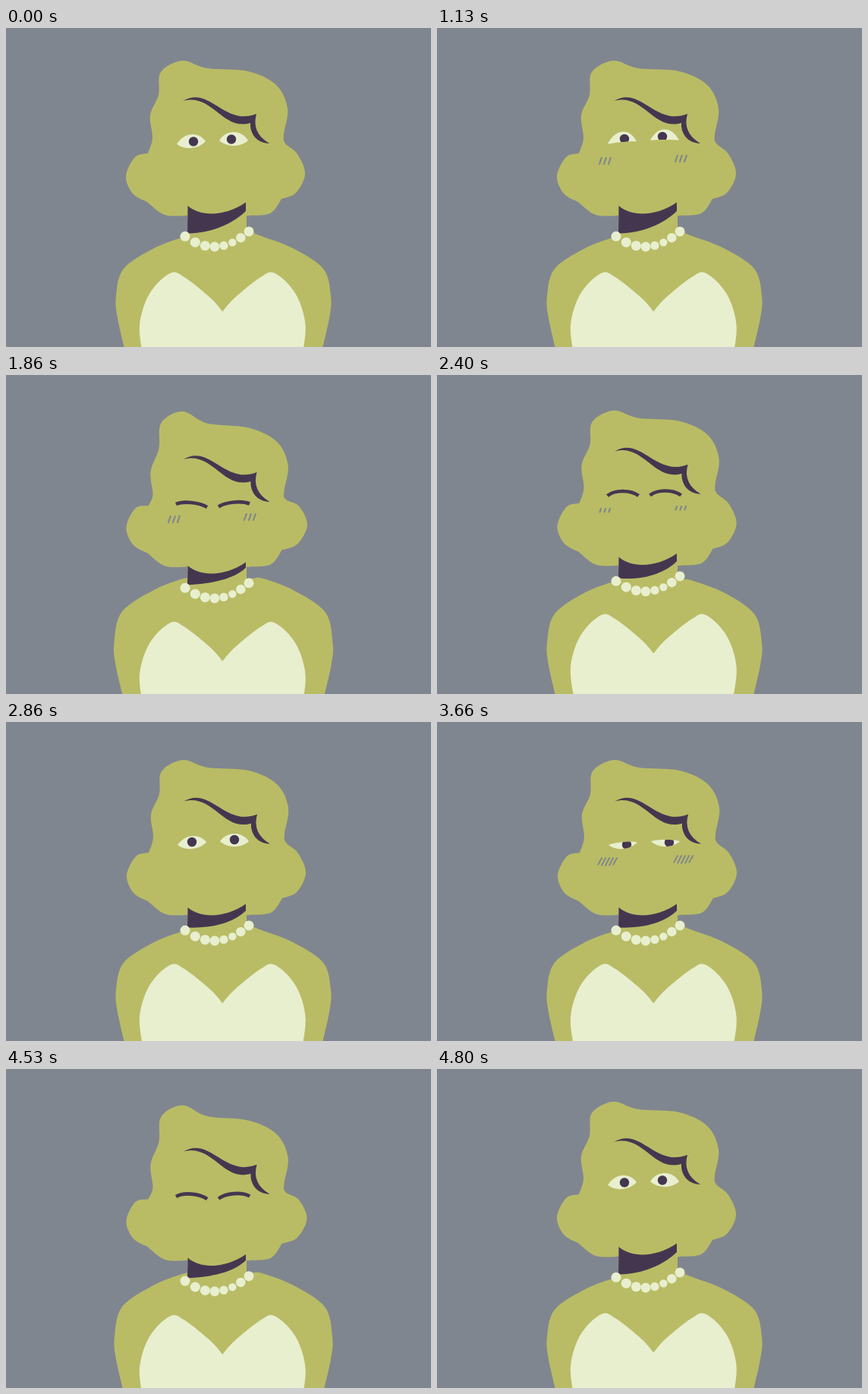
An HTML page with a canvas for the animation above (5 s loop, 560 px wide and 420 px high).

```html
<!DOCTYPE html>
<html lang="en">
<head>
<meta charset="utf-8">
<title>Portrait</title>
<style>
html, body { margin: 0; width: 100%; height: 100%; overflow: hidden; background: #80868f; }
canvas { display: block; }
</style>
</head>
<body>
<canvas id="stage" width="560" height="420"></canvas>
<script>
const ctx = document.getElementById('stage').getContext('2d');
const LOOP = 5000;
const BG = '#80868f', SKIN = '#b9bc65', CREAM = '#e8efcf', DARK = '#453650', BLUSH = '#82878a';

// Outlines by key points; a repeated point makes a corner.
const HEAD = [
  [201, 88], [204, 58], [232, 43], [265, 53], [319, 57], [356, 75], [371, 106], [366, 140],
  [368, 152], [384, 166], [394, 192], [382, 217], [363, 225], [363, 225], [348, 244], [317, 247],
  [317, 247], [240, 247], [240, 247], [209, 246], [186, 229], [186, 229], [167, 218], [158, 195],
  [170, 170], [187, 165], [187, 165], [193, 145], [190, 115]
];
const mirror = (half, axis) => [...half, ...half.map(([x, y]) => [2 * axis - x, y]).reverse()];
const SHOULDERS = mirror([
  [158, 430], [158, 430], [147, 382], [145, 353], [155, 317], [195, 290], [234, 275], [247, 270], [247, 270]
], 286.5);
const DRESS = mirror([
  [182, 440], [182, 440], [176, 392], [189, 350], [216, 323], [235, 328], [270, 356], [285, 373]
], 285.3);
const CURL = new Path2D('M233 96C268 75 288 130 330 113Q323 138 347 152C330 152 321 138 322 125C285 136 272 85 233 96');

// sink lowers the head, squash compresses the figure, rise lifts the chest.
const REST = {
  sink: 0, squash: 0, rise: 0,
  up: 11, down: 7, cross: 3, gaze: 0, look: -1.5, shut: 0, blush: 0
};
const LASHES = { up: 6, down: 0, shut: 1 };
const linear = k => k;
const anticipate = k => k * (3 * k - 2);
const spring = k => 1 - (1 - .6 * k) * Math.cos(k * 2.5 * Math.PI);

// Each phase moves to new values in a number of held steps.
const phase = (at, steps, gap, to, ease = linear) => ({ at, steps, gap, to, ease });
const PHASES = [
  phase(400, 3, 130, { up: 14.5, down: -1, look: -5, blush: .4 }),
  phase(800, 1, 130, { blush: 1 }),
  phase(1000, 3, 130, { ...LASHES, sink: -.6 }, anticipate),
  phase(1400, 6, 92, { sink: 0, squash: 1, up: 4 }, spring),
  phase(2000, 3, 130, { sink: 1, squash: 0, up: 6, blush: .4 }),
  phase(2400, 1, 60, { sink: .55, rise: 1 }),
  phase(2460, 1, 60, { sink: 1, rise: 0 }),
  phase(2600, 3, 130, { up: 10, down: 7, cross: 0, look: -2, shut: 0, blush: 0 }),
  phase(3400, 3, 130, { up: 2, gaze: 5, look: 1.5, blush: 1.5 }),
  phase(3800, 3, 130, { up: .3, gaze: 6, look: 2, blush: 2 }),
  phase(4400, 2, 65, { ...LASHES, up: 4, squash: 1.2, sink: 0, blush: 0 }),
  phase(4530, 3, 65, { ...REST, up: 7, sink: .3 }),
  phase(4800, 1, 60, REST)
];

function poseAt(t) {
  const p = { ...REST };
  for (const { at, steps, gap, to, ease } of PHASES) {
    if (t < at) break;
    const k = ease(Math.min(steps, 1 + Math.floor((t - at) / gap)) / steps);
    for (const n in to) p[n] += (to[n] - p[n]) * k;
  }
  return p;
}

const clamp = v => Math.max(0, Math.min(1, v));

// Closed Catmull-Rom curve.
function shape(pts, color) {
  const n = pts.length, at = i => pts[(i + n) % n];
  ctx.beginPath();
  ctx.moveTo(...pts[0]);
  for (let i = 0; i < n; i++) {
    const a = at(i - 1), b = at(i), c = at(i + 1), d = at(i + 2);
    ctx.bezierCurveTo(b[0] + (c[0] - a[0]) / 6, b[1] + (c[1] - a[1]) / 6,
      c[0] - (d[0] - b[0]) / 6, c[1] - (d[1] - b[1]) / 6, c[0], c[1]);
  }
  ctx.fillStyle = color;
  ctx.fill();
}

function disc(x, y, r, color) {
  ctx.beginPath();
  ctx.arc(x, y, r, 0, 7);
  ctx.fillStyle = color;
  ctx.fill();
}

function drawBody(p) {
  const hunch = 7 * p.squash + 3.5 * p.rise;
  shape(SHOULDERS.map(([x, y]) => [
    x + Math.sign(x - 286) * 2.5 * p.squash * clamp((Math.abs(x - 286) - 95) / 35),
    y - hunch * clamp((345 - y) / 40) * clamp((Math.abs(x - 286) - 35) / 15)
  ]), SKIN);
  ctx.fillRect(239, 225, 78, 60);
}

function drawHead(p) {
  const hair = 7 * p.sink + 12.5 * p.squash, ear = 7 * p.sink + 5.5 * p.squash;
  const dx = p.sink + p.squash / 2;
  shape(HEAD.map(([x, y]) => {
    const k = clamp((y - 150) / 20);
    const bun = -7.5 * p.squash * clamp((272 - x) / 30) * clamp((115 - y) / 55);
    return [x + dx + 2.5 * p.squash * clamp((x - 370) / 20), y + hair + (ear - hair) * k + bun];
  }), SKIN);
  ctx.save();
  ctx.translate(dx, 8.5 * p.sink + 15 * p.squash);
  ctx.fillStyle = DARK;
  ctx.fill(CURL);
  ctx.restore();
}

function drawShadow(p, chest) {
  const jaw = 10 * p.sink + 17 * p.squash;
  ctx.beginPath();
  ctx.moveTo(239.5, 234 + jaw);
  ctx.bezierCurveTo(256, 249 + jaw, 290, 248 + jaw, 316, 229.5 + jaw);
  ctx.lineTo(316, 241 + jaw * .75);
  ctx.bezierCurveTo(300, 257 + jaw * .7, 272, 270 + (jaw + chest) * .2, 239, 270.5 + chest);
  ctx.fillStyle = DARK;
  ctx.fill();
}

function drawPearls(chest) {
  for (let i = 0; i < 8; i++) {
    const x = 236 + 12 * i + 3 * Math.sin(Math.PI * i / 7);
    disc(x, 288 - .0095 * (x - 274) ** 2 + chest, 6.5 - 1.4 * Math.exp(-((i - 4.7) ** 2)), CREAM);
  }
}

function lid(x, y, bulge, tilt, w) {
  ctx.bezierCurveTo(x - w / 2, y - bulge * 4 / 3 + tilt / 2,
    x + w / 2, y - bulge * 4 / 3 - tilt / 2, x + w, y - tilt);
}

function drawEye(x, y, side, p) {
  ctx.beginPath();
  if (p.shut > .5) {
    const base = y + p.up / 2 + (side > 0 ? 2.5 : 0), tilt = 2 * side * p.squash;
    ctx.moveTo(x - 20, base + tilt);
    lid(x, base, p.up, tilt, 21);
    ctx.strokeStyle = DARK;
    ctx.lineWidth = 4.6;
    ctx.stroke();
    return;
  }
  const tilt = side < 0 ? 1.8 : 0;
  ctx.save();
  ctx.moveTo(x - 19, y + tilt);
  lid(x, y, p.up, tilt, 19);
  lid(x, y, -p.down, -tilt, -19);
  ctx.fillStyle = CREAM;
  ctx.fill();
  ctx.clip();
  disc(x + p.gaze - side * p.cross, y + p.look, 6.2, DARK);
  ctx.restore();
}

function drawBlush(x, y, p) {
  if (p.blush < .2) return;
  const thick = clamp(p.blush - 1);
  const n = 3 + Math.round(3 * thick), gap = 6 - 2 * thick, h = 2 + 6 * clamp(p.blush);
  const top = y + 20 - 4 * p.squash - 2 * thick;
  ctx.beginPath();
  for (let i = 0; i < n; i++) {
    const long = thick * Math.sin(Math.PI * (i + .5) / n), px = x + i * gap;
    ctx.moveTo(px - long, top + h + 4 * long);
    ctx.lineTo(px + h * (.35 + .45 * thick), top);
  }
  ctx.strokeStyle = BLUSH;
  ctx.lineWidth = 2.2 - .5 * thick;
  ctx.lineCap = 'round';
  ctx.stroke();
  ctx.lineCap = 'butt';
}

function draw(t) {
  const p = poseAt(t);
  const chest = 6 * p.squash - 3 * p.rise;
  const drop = 3.5 * p.squash - 3 * p.sink - 5 * p.rise;
  ctx.fillStyle = BG;
  ctx.fillRect(0, 0, 560, 420);
  drawBody(p);
  drawHead(p);
  drawShadow(p, chest);
  shape(DRESS.map(([x, y]) => [x, y + drop]), CREAM);
  drawPearls(chest);
  for (const side of [-1, 1]) {
    const x = 272 + side * 28 + p.sink, y = 149.5 - side * 1.5 + 9 * p.sink + 19 * p.squash;
    drawEye(x, y, side, p);
    drawBlush(x - 8 + side * 22 - 5 * clamp(p.blush - 1), y, p);
  }
}

const start = performance.now();
function tick() {
  draw((performance.now() - start) % LOOP);
  requestAnimationFrame(tick);
}
tick();
</script>
</body>
</html>
```
